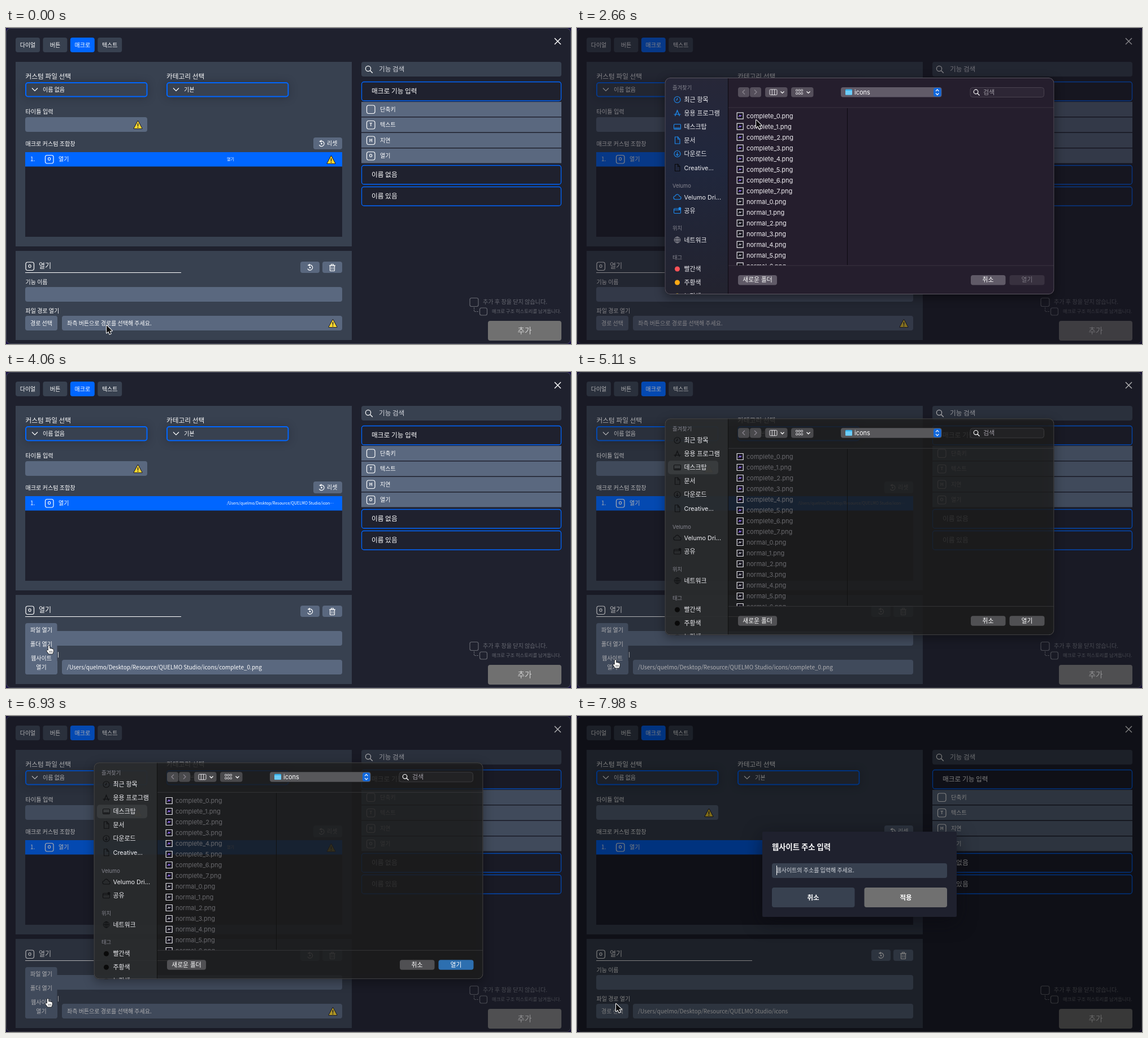
These frames come from a looping animation (1000 px wide and 560 px high, 8 s). An HTML page with a canvas:

```html
<!DOCTYPE html>
<html lang="ko">
<head>
<meta charset="utf-8">
<title>매크로 설정</title>
<style>
html, body { margin: 0; width: 100%; height: 100%; overflow: hidden; background: #120c2a; }
canvas { display: block; width: 1000px; height: 560px; }
</style>
</head>
<body>
<canvas id="stage" width="1000" height="560"></canvas>
<script>
const g = document.getElementById('stage').getContext('2d');
const LOOP = 8000, STEP = 70;
const KR = '"Noto Sans CJK KR", "Noto Sans KR", "Noto Sans CJK", "Noto Sans", sans-serif';
const UI = 'Inter, "Noto Sans CJK KR", "Noto Sans CJK", sans-serif';
const BG = '#1f212e', PANEL = '#384150', FIELD = '#5a687f', BLUE = '#0066ff', WHITE = '#fff';
const DIR = '/Users/quelmo/Desktop/Resource/QUELMO Studio/icons';

// Each session: click on a menu item, system panel opens, panel closes.
const sessions = [
  { click: 770, end: 3290, files: true },
  { click: 4200, end: 5390 },
  { click: 6020, end: 7140 }
];
const menus = [[350, 1820], [3850, 5250], [5950, 7070], [7560, 7700]];
const clicks = [350, 770, 2730, 3220, 3850, 4200, 5670, 6020, 7560, 7700];
const moves = [
  [70, 178, 527], [350, 66, 520], [490, 66, 520], [630, 62, 456], [770, 62, 456],
  [1100, 81, 415], [2030, 81, 415], [2660, 317, 163], [2800, 317, 163],
  [3150, 790, 444], [3360, 790, 444], [3640, 680, 470], [3850, 66, 518], [3920, 66, 518],
  [4060, 76, 485], [4200, 76, 485], [4620, 68, 510], [5250, 68, 510], [5530, 538, 422],
  [5740, 538, 422], [5950, 66, 512], [6020, 67, 481], [6090, 67, 481], [6300, 74, 501],
  [6930, 74, 501], [7350, 69, 510]
];

const clamp = v => Math.max(0, Math.min(1, v));
const ramp = (t, from, len) => clamp((t - from) / len);
const smooth = p => p * p * (3 - 2 * p);

function box(x, y, w, h, r, fill, stroke, lw = 1) {
  g.beginPath();
  g.roundRect(x, y, w, h, r);
  if (fill) { g.fillStyle = fill; g.fill(); }
  if (stroke) { g.strokeStyle = stroke; g.lineWidth = lw; g.stroke(); }
}
function line(color, lw, ...p) {
  g.beginPath();
  for (let i = 0; i < p.length; i += 2) g.lineTo(p[i], p[i + 1]);
  g.strokeStyle = color; g.lineWidth = lw; g.stroke();
}
function ring(x, y, r, color, lw, from = 0, to = Math.PI * 2) {
  g.beginPath(); g.arc(x, y, r, from, to);
  g.strokeStyle = color; g.lineWidth = lw; g.stroke();
}
function dot(x, y, r, color) {
  g.beginPath(); g.arc(x, y, r, 0, Math.PI * 2);
  g.fillStyle = color; g.fill();
}
// y is the optical middle of the line
function text(s, x, y, size, color = WHITE, weight = 500, align = 'left', font = KR) {
  g.font = `${weight} ${size}px ${font}`;
  g.textAlign = align;
  g.fillStyle = color;
  g.fillText(s, x, y + size * 0.37);
}
const label = (s, x, y, color = WHITE, size = 11) => text(s, x, y, size, color, 400, 'left', UI);

function keyIcon(x, y, letter) {
  box(x - 7, y - 7, 14.5, 14.5, 3.5, null, WHITE, 1.2);
  text(letter, x + .2, y, 8, WHITE, 700, 'center');
}
function warning(x, y) {
  g.beginPath();
  g.moveTo(x, y - 7); g.lineTo(x + 7, y + 6); g.lineTo(x - 7, y + 6); g.closePath();
  g.lineJoin = 'round';
  g.strokeStyle = '#22222a'; g.lineWidth = 2; g.stroke();
  g.fillStyle = '#ffd92e'; g.fill();
  g.lineJoin = 'miter';
  line('#22222a', 1.6, x, y - 3, x, y + 2);
  dot(x, y + 4, .9, '#22222a');
}
function resetIcon(x, y) {
  ring(x, y, 4.6, WHITE, 1.2, -1.9, 2.7);
  dot(x, y, 1.4, WHITE);
  g.beginPath();
  g.moveTo(x - 4.5, y - 4); g.lineTo(x, y - 6.8); g.lineTo(x - .4, y - 2.2);
  g.fillStyle = WHITE; g.fill();
}
function trashIcon(x, y) {
  line(WHITE, 1.2, x - 5.5, y - 3.5, x + 5.5, y - 3.5);
  line(WHITE, 1.1, x - 2, y - 4, x - 2, y - 5.7, x + 2, y - 5.7, x + 2, y - 4);
  box(x - 4, y - 3.5, 8, 9.5, 1, null, WHITE, 1.2);
  for (const d of [-1.5, 1.5]) line(WHITE, .9, x + d, y - 1, x + d, y + 4);
}
function lens(x, y, r, color = WHITE) {
  ring(x, y, r, color, 1.2);
  line(color, 1.3, x + r * .7, y + r * .7, x + r * 1.7, y + r * 1.7);
}
function chevron(x, y, w, color = WHITE) {
  line(color, 1.2, x - w, y - w / 2, x, y + w / 2, x + w, y - w / 2);
}
function select(x, value) {
  g.save();
  g.shadowColor = 'rgba(20,22,32,.4)'; g.shadowBlur = 16; g.shadowOffsetY = 1;
  box(x, 97, 214.5, 24.5, 4, PANEL);
  g.restore();
  box(x, 97, 214.5, 24.5, 4, null, BLUE, 2);
  chevron(x + 16, 109, 5);
  text(value, x + 30, 109, 10);
}

function drawApp(path, menuOpen) {
  g.fillStyle = '#1a1145'; g.fillRect(0, 0, 1000, 560);
  box(.5, .5, 999, 559, 8, BG, '#4a4c5c');

  ['다이얼', '버튼', '매크로', '텍스트'].forEach((s, i) => {
    const x = 17 + i * 48.4;
    box(x, 17, 43, 26, 4, i === 2 ? BLUE : PANEL);
    text(s, x + 21.5, 30, 10, WHITE, 500, 'center');
  });
  line(WHITE, 1.5, 971, 18, 982, 29);
  line(WHITE, 1.5, 982, 18, 971, 29);

  g.fillStyle = PANEL;
  g.fillRect(17, 60, 595, 327);
  g.fillRect(17, 395, 595, 158);

  text('커스텀 파일 선택', 34.5, 86, 11.7);
  text('카테고리 선택', 284, 86, 11.7);
  select(35, '이름 없음');
  select(285, '기본');
  text('타이틀 입력', 34.5, 148.5, 10.2);
  box(34, 158, 216, 26, 4, FIELD);
  warning(233.5, 172);
  text('매크로 커스텀 조합창', 34.5, 205.5, 10.1);
  box(544, 194, 51, 21, 4, FIELD);
  resetIcon(558.5, 205);
  text('리셋', 568, 204.5, 10);

  g.fillStyle = BG; g.fillRect(34, 220, 561, 150);
  g.fillStyle = BLUE; g.fillRect(34, 220, 561, 25.5);
  text('1.', 43, 232.5, 10);
  keyIcon(76.5, 232.5, 'O');
  text('열기', 93, 232.5, 10);
  text(!path ? '열기' : path === DIR ? DIR : DIR.slice(0, -1) + '⋯', 391, 232.5, 7);
  if (!path) warning(575.5, 234);

  keyIcon(42, 422, 'O');
  text('열기', 58, 421.5, 12);
  line(WHITE, 1, 34, 433.5, 310, 433.5);
  box(521, 414, 34, 20, 4, FIELD);
  box(560, 414, 35, 20, 4, FIELD);
  resetIcon(538, 424.5);
  trashIcon(577.5, 424.5);
  text('기능 이름', 34.5, 450.5, 10);
  box(34, 459, 561, 26, 4, FIELD);
  text('파일 경로 열기', 34.5, 501.5, 10);
  box(34, 510, 57, 26, 4, FIELD);
  text('경로 선택', 62.5, 523, 10, WHITE, 500, 'center');
  box(99, 510, 496, 26, 4, FIELD);
  text(path || '좌측 버튼으로 경로를 선택해 주세요.', 108, 523, 10);
  if (!path) warning(578.5, 524);

  box(629, 60, 354, 26, 4, PANEL);
  lens(641, 72, 4.6);
  text('기능 검색', 660, 73, 11.6, '#d8dae0', 400);
  [[95, '매크로 기능 입력'], [243, '이름 없음'], [281, '이름 있음']].forEach(([y, s]) => {
    box(629.5, y + .5, 353, 33.5, 4, BG, BLUE, 1.3);
    text(s, 647, y + 17, 11.7);
  });
  ['단축키', '텍스트', '지연', '열기'].forEach((s, i) => {
    const y = 131 + i * 27.5;
    g.fillStyle = FIELD; g.fillRect(629, y, 354, 26);
    keyIcon(645.5, y + 13, ' THO'[i]);
    text(s, 662, y + 13, 10);
  });

  const dim = '#666871';
  box(821, 478.5, 15, 15, 3, null, dim, 1.2);
  box(838.5, 496, 13, 13, 3, null, dim, 1.2);
  g.setLineDash([3, 1]);
  line(dim, 1, 828.5, 495, 828.5, 502.5, 837, 502.5);
  g.setLineDash([]);
  text('추가 후 창을 닫지 않습니다.', 844, 485.5, 10.1, dim, 400);
  text('매크로 구조 히스토리를 남겨둡니다.', 860, 502, 8.3, dim, 400);
  box(853, 519, 130, 35, 4, '#707070');
  text('추가', 918, 536.5, 13.5, '#d2d2d2', 500, 'center');

  if (menuOpen) {
    box(34, 445, 56.5, 91, 4, FIELD);
    ['파일 열기', '폴더 열기', '웹사이트', '열기'].forEach((s, i) =>
      text(s, 62.5, [457, 482, 507, 523.5][i], 10, WHITE, 500, 'center'));
  }
}

const sideIcons = {
  clock(x, y, c) { ring(x, y, 5.5, c, 1.1); line(c, 1.1, x, y - 3, x, y, x - 2.5, y + 1); },
  app(x, y, c) {
    line(c, 1.3, x - 4, y + 5, x, y - 5, x + 4, y + 5);
    line(c, 1.2, x - 6, y + 2, x + 6, y + 2);
  },
  desk(x, y, c) { box(x - 6, y - 4.5, 12, 9, 1.5, null, c, 1.1); line(c, 1.6, x - 5, y + 2.5, x + 5, y + 2.5); },
  doc(x, y, c) {
    line(c, 1.1, x + 1, y - 6, x - 4, y - 6, x - 4, y + 6, x + 4.5, y + 6, x + 4.5, y - 2, x + 1, y - 2, x + 1, y - 6, x + 4.5, y - 2);
  },
  down(x, y, c) {
    ring(x, y, 5.5, c, 1.1);
    line(c, 1.1, x, y - 3, x, y + 3);
    line(c, 1.1, x - 2.3, y + .7, x, y + 3, x + 2.3, y + .7);
  },
  cloud(x, y, c) {
    g.beginPath();
    g.arc(x - 3.5, y + 1.2, 3, Math.PI / 2, -Math.PI / 2);
    g.arc(x, y - 1, 3.6, -Math.PI * .9, -.2);
    g.arc(x + 4, y + 1.6, 2.6, -Math.PI / 2, Math.PI / 2);
    g.closePath();
    g.strokeStyle = c; g.lineWidth = 1.1; g.stroke();
  },
  folder(x, y, c) {
    box(x - 6, y - 3.5, 12, 8.5, 1.5, null, c, 1.1);
    line(c, 1.1, x - 6, y - 1, x + 6, y - 1);
    dot(x + 4.5, y - 3.5, 2.4, c);
  },
  globe(x, y, c) {
    ring(x, y, 5.3, c, 1);
    g.beginPath(); g.ellipse(x, y, 2.4, 5.3, 0, 0, 7); g.stroke();
    line(c, 1, x - 5, y, x + 5, y);
    line(c, 1, x, y - 5, x, y + 5);
  }
};
const sidebar = [
  [106, '즐겨찾기'], [127, '최근 항목', 'clock'], [151, '응용 프로그램', 'app'], [175, '데스크탑', 'desk'],
  [199, '문서', 'doc'], [223, '다운로드', 'down'], [247.5, 'Creative...', 'doc'],
  [280, 'Velumo'], [299.5, 'Velumo Dri...', 'cloud'], [323.5, '공유', 'folder'],
  [355, '위치'], [375.5, '네트워크', 'globe'],
  [406.5, '태그'], [427, '빨간색', '#ff5257'], [451, '주황색', '#ffa914'], [475, '노란색', '#ffd426']
];

function drawPanel({ files, alpha, dy, active, picked, primary }) {
  g.save();
  g.translate(0, dy);
  g.globalAlpha = alpha;
  g.save();
  g.shadowColor = 'rgba(0,0,0,.45)'; g.shadowBlur = 18; g.shadowOffsetY = 5;
  box(155.5, 88, 689, 384, 9, active ? '#251e2d' : '#1e1e1f');
  g.restore();
  g.beginPath(); g.roundRect(155.5, 88, 689, 384, 9); g.clip();
  if (active) {
    const tint = g.createLinearGradient(0, 88, 0, 472);
    tint.addColorStop(0, '#272738'); tint.addColorStop(.4, '#20273d'); tint.addColorStop(1, '#23232f');
    g.fillStyle = tint;
  } else g.fillStyle = '#2d2f32';
  g.fillRect(155, 88, 112, 384);
  g.globalAlpha = clamp(alpha * 1.3);

  if (!active) box(161, 163, 89, 24, 5, 'rgba(255,255,255,.07)');
  for (const [y, s, icon] of sidebar) {
    if (!icon) { label(s, 169, y, '#85858f', 9.3); continue; }
    if (icon[0] === '#') dot(177.5, y, 4.5, active ? icon : '#0a0a0a');
    else {
      const plain = s[0] === 'C' ? '#08080a' : icon === 'globe' ? '#94949c' : '#1c8cf2';
      sideIcons[icon](177.5, y, active ? plain : '#101113');
    }
    label(s, 189.5, y, '#eeeef2', 10.9);
  }

  const seam = active ? '#0d0a11' : '#111';
  line(seam, 1, 267.5, 88, 267.5, 472);
  line(active ? '#3a3341' : '#353537', 1, 268, 141, 844, 141);
  line(active ? '#3a3341' : '#353537', 1, 268, 421, 844, 421);
  line(seam, 1, 478.5, 142, 478.5, 420);

  const tool = active ? '#554f5b' : '#49494c';
  box(285, 105, 20, 17.5, 4, tool);
  box(306, 105, 20, 17.5, 4, tool);
  line('#8b868f', 1.2, 297, 109.5, 293, 113.5, 297, 117.5);
  line('#8b868f', 1.2, 314, 109.5, 318, 113.5, 314, 117.5);
  box(333, 105, 39.5, 17.5, 4, tool);
  box(379, 105, 39.5, 17.5, 4, tool);
  box(341, 109, 13, 9.5, 1.5, null, '#e4e2e6');
  for (const x of [345.3, 349.6]) line('#e4e2e6', 1, x, 109, x, 118.5);
  for (let i = 0; i < 6; i++) box(387.5 + i % 3 * 4.5, 109 + (i / 3 | 0) * 5.5, 3, 3, .6, null, '#e4e2e6', .9);
  chevron(363.5, 114, 3);
  chevron(409.5, 114, 3);
  box(467, 105, 178.5, 17.5, 4, active ? '#615b68' : '#57575a');
  box(475, 108.5, 12, 10, 1.5, '#36b4ef');
  box(475, 111, 12, 7.5, 1, '#6dcdf8');
  label('icons', 491, 113.5);
  box(631, 106, 13.5, 15.5, 3.5, '#1268dc');
  line(WHITE, 1.2, 635, 112, 637.7, 109, 640.4, 112);
  line(WHITE, 1.2, 635, 115.5, 637.7, 118.5, 640.4, 115.5);
  box(696, 105.5, 130.5, 17, 4, active ? '#2d2635' : '#222224', active ? '#49424f' : '#3b3b3d');
  lens(706, 113, 3.8);
  label('검색', 719, 114, '#a09ca5');

  g.save();
  g.beginPath(); g.rect(268, 142, 210, 278.5); g.clip();
  for (let i = 0; i < 15; i++) {
    const y = 155.5 + i * 19, done = i < 8;
    if (picked && !i) box(281, y - 9, 190, 18, 4, '#0a57c8');
    box(283.2, y - 5.3, 11, 11, 0, '#14121c', '#e6e6ea', 1.2);
    line(done ? '#9b72ff' : '#b8b8c0', 1.2, 286, y + 2, 288, y - 1, 289, y + 1, 291, y - 1);
    label(`${done ? 'complete' : 'normal'}_${done ? i : i - 8}.png`, 300, y, files ? '#f2f0f4' : '#69696d');
  }
  g.restore();

  const btn = active ? '#605a67' : '#505053';
  const ready = !files || picked;
  box(285, 438, 69, 17.5, 4, btn);
  text('새로운 폴더', 319.5, 446.5, 10.8, WHITE, 500, 'center', UI);
  box(697, 438, 61.5, 17.5, 4, btn);
  text('취소', 727.5, 446.5, 10.8, WHITE, 500, 'center', UI);
  box(765.5, 438, 62, 17.5, 4, primary ? '#2d6fb0' : ready ? btn : '#38313f');
  text('열기', 796.5, 446.5, 10.8, ready ? WHITE : '#7d7883', 500, 'center', UI);
  box(156, 88.5, 688, 383, 9, null, active ? '#5b5761' : '#4b4b4d');
  g.restore();
}

function drawPopup(p) {
  g.save();
  g.globalAlpha = p;
  g.fillStyle = 'rgba(0,0,0,.5)'; g.fillRect(0, 0, 1000, 560);
  g.save();
  g.shadowColor = 'rgba(10,10,16,.6)'; g.shadowBlur = 32; g.shadowOffsetY = 8;
  box(328, 205, 344, 151, 2, BG);
  g.restore();
  text('웹사이트 주소 입력', 345, 232.5, 13.3, WHITE, 700);
  box(345, 261, 310, 26, 4, PANEL);
  line(WHITE, 1, 353.5, 265, 353.5, 282);
  text('웹사이트의 주소를 입력해 주세요.', 352.5, 273.5, 10, '#d5d8de', 500);
  box(345, 304, 146.5, 35, 4, PANEL);
  box(508.5, 304, 146.5, 35, 4, '#707070');
  text('취소', 418, 321.5, 11.5, WHITE, 700, 'center');
  text('적용', 582, 321.5, 11.5, WHITE, 700, 'center');
  g.restore();
}

function cursorAt(t) {
  let a = moves[0];
  for (const b of moves) {
    if (t < b[0]) {
      const p = smooth(ramp(t, a[0], b[0] - a[0]));
      return [a[1] + (b[1] - a[1]) * p, a[2] + (b[2] - a[2]) * p];
    }
    a = b;
  }
  return [a[1], a[2]];
}
const arrowShape = new Path2D('M0 0V13.5L3.2 10.6L5.4 15.6L7.7 14.6L5.5 9.8H9.8Z');
const handShape = new Path2D('M-1.2 1Q0 -.8 1.2 1V5.2Q2.6 4.2 3.6 5.6Q5 4.8 5.8 6.2Q7.6 5.6 7.8 7.4V10.5L6.4 14.5H-.2L-4 9.3Q-3.6 7.2 -1.2 8.6Z');
function drawCursor(x, y, hand) {
  g.save();
  g.translate(x, y);
  g.lineJoin = 'round';
  const shape = hand ? handShape : arrowShape;
  g.strokeStyle = hand ? '#111' : WHITE;
  g.fillStyle = hand ? WHITE : '#0b0b0d';
  g.lineWidth = hand ? 1.4 : 2;
  g.stroke(shape);
  g.fill(shape);
  if (hand) for (const d of [1, 3.1, 5.2]) line('#222', .7, d, 9, d, 12.5);
  g.restore();
}

function draw(t) {
  const menuOpen = menus.some(([a, b]) => t >= a && t < b);
  const path = t < 3430 ? '' : t < 5740 ? DIR + '/complete_0.png' : t < 7210 ? '' : DIR;
  const popup = ramp(t, 7700, 210);
  g.globalAlpha = 1;
  drawApp(path, menuOpen);

  let modal = false;
  const s = sessions.find(s => t >= s.click && t < s.end + 210);
  if (s) {
    const p = ramp(t, s.click + 800, 210);
    const out = 1 - ramp(t, s.end, 140);
    const shade = .33 * ramp(t, s.click + 420, 210) + .2 * clamp(p * 2 - 1.1);
    g.fillStyle = `rgba(14,13,20,${shade * (1 - ramp(t, s.end, 210))})`;
    g.fillRect(0, 0, 1000, 560);
    const alpha = (1 - (1 - p) ** 2) * out;
    modal = p === 1 && out > 0;
    if (alpha > 0) {
      const picked = s.files && t >= 2730;
      drawPanel({
        files: s.files, alpha, dy: -12 * (1 - p), active: p === 1, picked,
        primary: picked || (!s.files && (p === 1 || s.click > 6000))
      });
    }
  }
  if (popup) drawPopup(popup);

  const [x, y] = cursorAt(t);
  const hit = clicks.find(c => t >= c && t < c + 140);
  if (hit !== undefined) {
    const age = (t - hit) / 140, r = 26 + age * 5;
    g.globalAlpha = 1 - age;
    dot(x, y, r, 'rgba(40,46,60,.12)');
    ring(x, y, r, '#20242e', 2.6);
    ring(x, y, r, '#d6d9df', 1);
    g.globalAlpha = 1;
  }
  const overButton = (x < 91 && x > 34 && y >= 510 && y < 536) || (x > 521 && x < 555 && y > 414 && y < 434);
  drawCursor(x, y, !modal && !popup && ((menuOpen && x < 91 && y > 444) || overButton));
}

const start = performance.now();
function tick() {
  const t = (performance.now() - start) % LOOP;
  draw(Math.floor(t / STEP) * STEP);
  requestAnimationFrame(tick);
}
tick();
</script>
</body>
</html>
```
